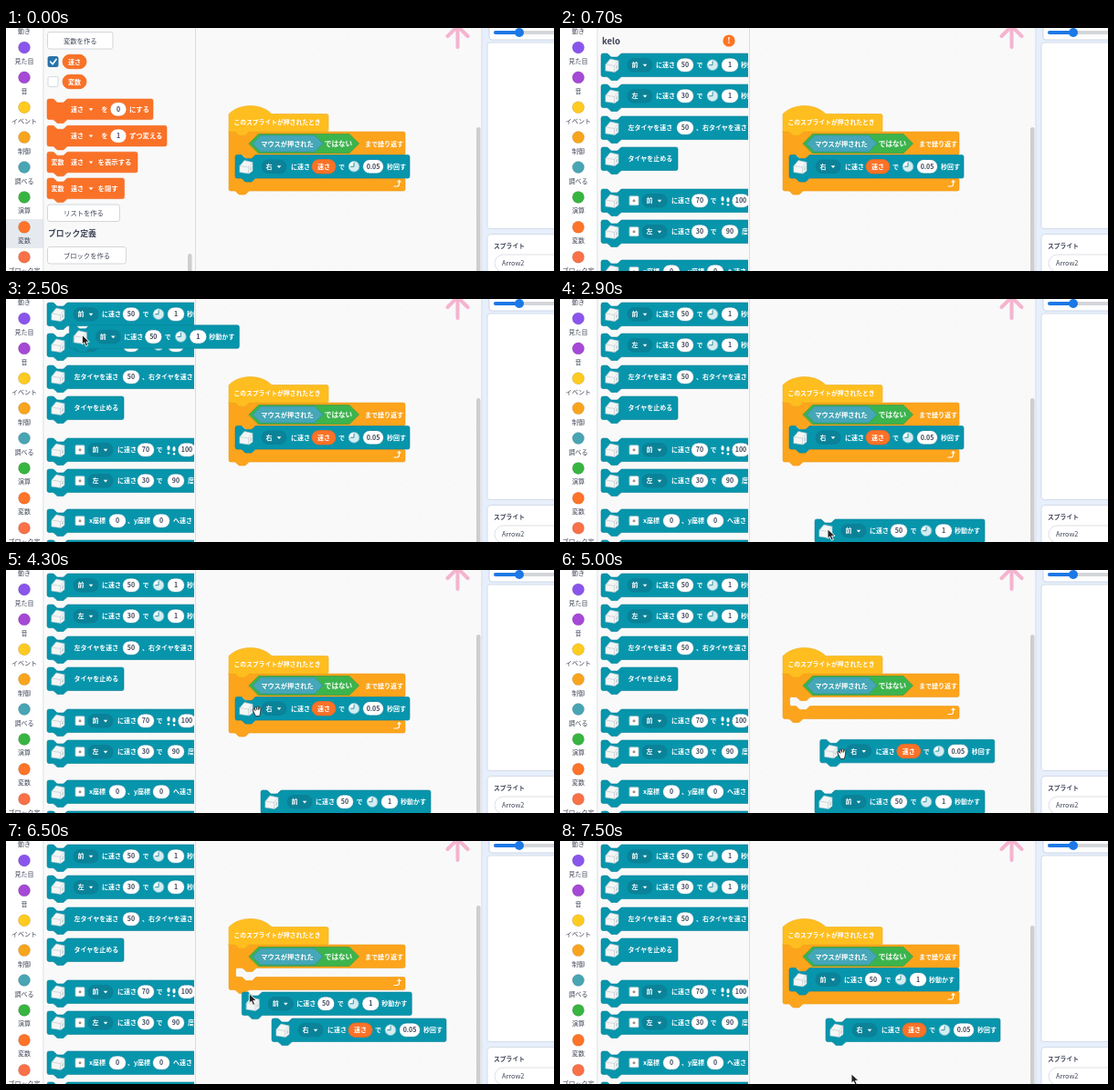
These frames come from a looping animation (600x267 px, 8000 ms). An HTML page:

```html
<!DOCTYPE html>
<html lang="ja">
<head>
<meta charset="utf-8">
<title>Block editor</title>
<style>
  html, body { margin: 0; width: 100%; height: 100%; overflow: hidden; background: #f9f9f9; }
  svg { display: block; width: 100vw; height: 100vh; }
  text { font-family: "Noto Sans CJK JP", "Noto Sans CJK", "Noto Sans", sans-serif; }
</style>
</head>
<body>
<svg id="stage" viewBox="0 0 600 267" preserveAspectRatio="none"></svg>
<script>
const TEAL = '#0795ac', TEAL_DARK = '#0a8298', ORANGE = '#fa7228', ORANGE_DARK = '#ee6a22';
const INK = '#3f4557';
const NOTCH = 'c1 0 1.5.5 2 1l2 2c.5.5 1 1 2 1h5c1 0 1.5-.5 2-1l2-2c.5-.5 1-1 2-1';
const BUMP = 'c-1 0-1.5.5-2 1l-2 2c-.5.5-1 1-2 1h-5c-1 0-1.5-.5-2-1l-2-2c-.5-.5-1-1-2-1';
const MID = 12.7;

// Drawing helpers, all returning SVG markup
const text = (x, y, s, { size = 7, fill = '#fff', anchor = 'middle', weight = 700 } = {}) =>
  `<text x="${x}" y="${y + size * .37}" font-size="${size}" font-weight="${weight}" fill="${fill}" text-anchor="${anchor}">${s}</text>`;
const left = (x, y, s, opts) => text(x, y, s, { anchor: 'start', ...opts });
const rect = (x, y, w, h, fill, rx = 0, stroke = 'none') =>
  `<rect x="${x}" y="${y}" width="${w}" height="${h}" rx="${rx}" fill="${fill}" stroke="${stroke}" stroke-width=".8"/>`;
const circle = (x, y, r, fill, stroke = 'none') =>
  `<circle cx="${x}" cy="${y}" r="${r}" fill="${fill}" stroke="${stroke}" stroke-width=".8"/>`;
const path = (d, fill, stroke = 'none', width = .6) =>
  `<path d="${d}" fill="${fill}" stroke="${stroke}" stroke-width="${width}" stroke-linejoin="round" stroke-linecap="round"/>`;
const group = (x, y, body, id = '') => `<g ${id && `id="${id}"`} transform="translate(${x} ${y})">${body}</g>`;

const pill = (x, y, w, s, fill = '#fff', stroke = 'none', color = INK) =>
  rect(x - w / 2, y - 7.7, w, 15.4, fill, 7.7, stroke) + text(x, y, s, { fill: color });
const number = (x, s, w = 19) => pill(x, MID, w, s, '#fff', TEAL_DARK);
const caret = (x, y) => path(`M${x - 2.3} ${y - 1}h4.6l-2.3 2.7z`, '#fff');
const menu = (x, s) =>
  rect(x - 8.5, MID - 7.7, 28, 15.4, TEAL_DARK, 7.7) + text(x, MID, s) + caret(x + 11, MID);
const word = (x, s) => left(x, MID, s);

const shape = (w, h) =>
  `M0 2q0-2 2-2h4${NOTCH}H${w - 2}q2 0 2 2V${h - 2}q0 2-2 2H23${BUMP}H2q-2 0-2-2z`;
const cube = group(5, 5,
  path('M0 7L5 1l9 2v9.500l-4 3-10-1.500z', '#f4f6f6', '#b3c9cd') +
  path('M0 7l9.500 1.500L14 3M9.500 8.500V15', 'none', '#b9c4c6') +
  path('M11 9l2-2v4l-2 1.500z', '#cfd8da'));
const clock = x => circle(x, MID, 5.9, '#d3edf1', '#6fbecb') +
  path(`M${x} ${MID}V${MID - 5.4}A5.4 5.4 0 0 0 ${x - 5.4} ${MID}z`, '#fff') +
  path(`M${x} ${MID - 4}v4h-3.4`, 'none', '#2f8d9d', 1);
const mat = rect(31, MID - 5, 10, 10, '#fff', 1, '#a9c8cc') + circle(36, MID, 1.5, '#a58f84');
const feet = x => [-3, 3].map((d, i) =>
  `<ellipse cx="${x + d}" cy="${MID - 2 + i}" rx="1.6" ry="2.8" fill="#fff"/>` + circle(x + d, MID + 3.5 + i, 1.2, '#fff')).join('');
const teal = (w, body) => path(shape(w, 25.5), TEAL, TEAL_DARK) + cube + body;

const moveBlock = (dir, speed, tail) => teal(186,
  menu(37, dir) + word(60, 'に速さ') + number(92, speed) + word(104.5, 'で') + clock(122) +
  number(141, '1') + word(153, tail));
const turnBlock = teal(191,
  menu(37, '右') + word(61, 'に速さ') + pill(97, MID, 26, '速さ', ORANGE, ORANGE_DARK, '#fff') +
  word(113, 'で') + clock(130) + number(151, '0.05', 23) + word(166, '秒回す'));

function categories() {
  const items = [['動き', '#4c97ff'], ['見た目', '#8a55ec'], ['音', '#a549d6'], ['イベント', '#ffcb20'],
    ['制御', '#f8a51d'], ['調べる', '#48a5b4'], ['演算', '#38b541'], ['変数', '#ff7429'], ['ブロック定', '#fa7148']];
  return rect(0, 0, 41, 267, '#fff') + `<g id="selected">${rect(0, 210, 41, 32, '#e6eaef')}</g>` +
    items.map(([name, color], i) => {
      const y = 3.5 + i * 32.9;
      return circle(20, y - 15, 6.5, color, '#0002') + text(20, y, name, { fill: INK, weight: 500 });
    }).join('') + rect(40.5, 0, .8, 267, '#d5d9df');
}

function variablePalette() {
  const button = (y, w, s) => rect(45.5, y, w, 18.5, '#fff', 2.5, '#c9ccd2') +
    text(45.5 + w / 2, y + 9.5, s, { size: 7.3, fill: INK, weight: 500 });
  const variable = (y, s) => pill(75, y, 26, s, ORANGE, ORANGE_DARK, '#fff');
  const field = x => text(x, 11.3, '速さ') + caret(x + 15, 11.3);
  const block = (y, w, body) => group(45, y, path(shape(w, 22.6), ORANGE, ORANGE_DARK) + body);
  const setter = (value, tail) => field(33) + text(63, 11.3, 'を') +
    pill(78, 11.3, 18, value, '#fff', ORANGE_DARK) + left(90, 11.3, tail, { size: 7.3 });
  const viewer = tail => text(11.5, 11.3, '変数') + field(33) + left(55.5, 11.3, tail, { size: 7.4 });
  return button(4.5, 71.5, '変数を作る') +
    rect(46, 31.5, 11, 11, '#2675ad', 1.5, '#1c5f90') + path('M48.5 37l2.5 2.8 4-5.4', 'none', '#fff', 1.6) +
    variable(37, '速さ') + rect(46, 53.5, 11, 11, '#fff', 1.5, '#cdd1d6') + variable(59, '変数') +
    block(78, 116, setter('0', 'にする')) + block(107.3, 131, setter('1', 'ずつ変える')) +
    block(136.2, 99, viewer('を表示する')) + block(165, 84.5, viewer('を隠す')) +
    button(194, 79, 'リストを作る') +
    left(46, 226, 'ブロック定義', { size: 8.8, fill: INK }) + button(240.5, 86, 'ブロックを作る');
}

function robotPalette() {
  const at = (y, body) => group(45, y - 13, body);
  const matMove = (dir, speed, rest) => teal(200,
    mat + menu(53, dir) + word(77, 'に速さ') + number(108, speed) + word(119.5, 'で') + rest);
  return left(46, -10, 'kelo', { size: 9.5, fill: INK }) +
    `<circle id="status" cx="185" cy="-10" r="6.6"/>` + text(185, -10, '!', { size: 9 }) +
    at(17, moveBlock('前', '50', '秒動かす')) + at(51, moveBlock('左', '30', '秒回す')) +
    at(86, teal(200, word(29.5, '左タイヤを速さ') + number(92, '50') + word(104, '、右タイヤを速さ'))) +
    at(120, teal(84, word(29.5, 'タイヤを止める'))) +
    at(166, matMove('前', '70', feet(136) + number(153, '100', 20))) +
    at(200, matMove('左', '30', number(141, '90') + word(154, '度回す'))) +
    at(244, teal(200, mat + word(46, 'x座標') + number(77, '0') + word(88, '、y座標') + number(125, '0') + word(138, 'へ速さ'))) +
    at(278, teal(200, ''));
}

const loopPath = shift =>
  `M0 0H191q2 0 2 2V23.5q0 2-2 2H31${BUMP}H9.5q-2 0-2 2V${49 - shift}q0 2 2 2h4${NOTCH}H191q2 0 2 2` +
  `V${63 - shift}q0 2-2 2H23${BUMP}H2q-2 0-2-2z`;

function script() {
  const hex = (x1, x2, r, fill, stroke) =>
    path(`M${x1} 13L${x1 + r} ${13 - r}H${x2 - r}L${x2} 13L${x2 - r} ${13 + r}H${x1 + r}z`, fill, stroke);
  return group(244, 114,
    `<path id="loop" fill="#fca41c" stroke="#ee9a18" stroke-width=".6"/>` +
    path(`M0 0V-19.5c12-12 35-12 47 0H107q2 0 2 2V-2q0 2-2 2H23${BUMP}H0z`, '#ffbe1f', '#f0ac18') +
    text(53, -11, 'このスプライトが押されたとき', { size: 6.8 }) +
    hex(22, 142.5, 10.5, '#3cb44d', '#2f983e') + hex(26, 103, 9, '#45a7b8', '#338b9b') +
    text(64, 13, 'マウスが押された', { size: 7.2 }) + text(120, 13, 'ではない', { size: 7.6 }) +
    text(170, 13, 'まで繰り返す') +
    group(185, 57, path('M-4 3h3q2.5 0 2.5-2.5V-2', 'none', '#fff', 1.2) + path('M-1-1.6L1.5-4.2l2.5 2.6z', '#fff'), 'loopArrow'));
}

function sidePanel() {
  return rect(520.5, 0, 80, 267, '#e7effc') + rect(520.5, 0, .8, 267, '#d3dae6') +
    rect(529, -10, 90, 23, '#fff', 3, '#c3cddd') +
    rect(534, 3, 70, 4, '#d4d6da', 2) + rect(534, 3, 28, 4, '#1c78e6', 2) + circle(562, 5, 5, '#1c78e6') +
    rect(527, 16, 90, 204.5, '#fff', 3, '#cdd6e4') +
    rect(527, 226.5, 90, 60, '#fff', 4, '#cdd6e4') +
    left(534, 239.5, 'スプライト', { fill: INK, size: 6.8 }) +
    rect(535, 249, 90, 19, '#fff', 9.5, '#d3d7de') + left(543, 258.5, 'Arrow2', { fill: INK, weight: 500, size: 7.3 });
}

const arrowCursor = path('M0 0V10.2L2.4 8l1.9 4.3 2-.9L4.5 7.3H7.7z', '#222', '#fff', .9);
const handCursor = path('M1 6L.2 3.4q1.2-.8 1.8.4L3 5 2.3 1.2q1-1 1.7.1L4.8 4V.7q1-.9 1.7 0L6.7 4l.8-2.5q1.2-.5 1.5.5L8.5 7.5 7.6 11H3.6z', '#fff', '#222', .8);

const stage = document.getElementById('stage');
stage.innerHTML = `
  <defs>
    <pattern id="grid" width="19.3" height="19.3" patternUnits="userSpaceOnUse">${rect(8, 9.3, 1, 1, '#e9e9e9')}</pattern>
    <clipPath id="paletteClip">${rect(41, 0, 165, 267, '#000')}</clipPath>
  </defs>` +
  rect(0, 0, 600, 267, '#f9f9f9') + rect(208, 0, 312, 267, 'url(#grid)') +
  path('M483.5 9L494.5-2l11 11M494.5 0V21', 'none', '#f4b4d0', 4) +
  `<g clip-path="url(#paletteClip)"><g id="variables">${variablePalette()}</g><g id="robot">${robotPalette()}</g>` +
  `<rect id="thumb" x="199" width="4.5" height="60" rx="2.2" fill="#cecece"/></g>` +
  rect(207, 0, .9, 267, '#dadada') + categories() +
  script() + `<rect id="workspaceThumb" x="515" width="4.5" height="240" rx="2.2" fill="#cecece"/>` +
  group(0, 0, turnBlock, 'turn') + group(0, 0, moveBlock('前', '50', '秒動かす'), 'move') +
  sidePanel() +
  `<g id="cursor"><g id="arrow">${arrowCursor}</g><g id="hand">${handCursor}</g></g>`;

// Keyframes: [time, value, value...]
const SCROLL = [[400, 0], [500, 110], [600, 242], [700, 260], [800, 265], [1000, 284]];
const MOVE = [[2400, 45, 4], [2900, 279, 242], [6100, 279, 242], [6700, 251, 139.5]];
const TURN = [[4700, 251, 139.5], [5100, 291, 195]];
const CURSOR = [[1500, 100, 1], [2000, 59, 15], [2400, 59, 15], [2900, 293, 253], [3100, 293, 253], [3500, 282, 178],
  [3900, 282, 178], [4300, 270, 149.5], [4700, 270, 149.5], [5100, 310, 205], [5500, 310, 205], [5800, 287, 244],
  [6100, 287, 244], [6700, 259, 141.5], [7100, 259, 141.5], [7500, 319, 256]];

function sample(keys, t) {
  const i = keys.findIndex(k => k[0] > t);
  if (i === 0) return keys[0].slice(1);
  if (i < 0) return keys[keys.length - 1].slice(1);
  const a = keys[i - 1], b = keys[i];
  const p = (t - a[0]) / (b[0] - a[0]);
  const e = keys === SCROLL ? p : p * p * (3 - 2 * p);
  return a.slice(1).map((v, n) => v + (b[n + 1] - v) * e);
}

const el = id => document.getElementById(id);
const place = (id, x, y) => el(id).setAttribute('transform', `translate(${x} ${y})`);
const show = (id, on) => el(id).setAttribute('visibility', on ? 'visible' : 'hidden');

function draw(t) {
  const [scroll] = sample(SCROLL, t);
  place('variables', 0, -scroll);
  place('robot', 0, 284 - scroll);
  el('thumb').setAttribute('y', 248 + scroll * .1);
  el('status').setAttribute('fill', t < 500 ? '#ffbf1f' : '#ff7423');
  show('selected', t < 500);

  place('move', ...sample(MOVE, t));
  show('move', t >= 2500);
  place('turn', ...sample(TURN, t));
  // The scroll thumb is resized whenever a drop changes the script area
  el('workspaceThumb').setAttribute('y', t < 3200 ? 109 : t < 7200 ? 71 : 93);

  const shift = t >= 4800 && t < 6600 ? 15.5 : 0;
  el('loop').setAttribute('d', loopPath(shift));
  place('loopArrow', 185, 57 - shift);

  const grabbing = t >= 4000 && t < 5600;
  place('cursor', ...sample(CURSOR, t));
  show('arrow', t >= 1500 && !grabbing);
  show('hand', grabbing);
}

// The picture advances ten times a second, like a screen capture
function tick() {
  draw(Math.floor(performance.now() % 8000 / 100) * 100);
  requestAnimationFrame(tick);
}
tick();
</script>
</body>
</html>
```
